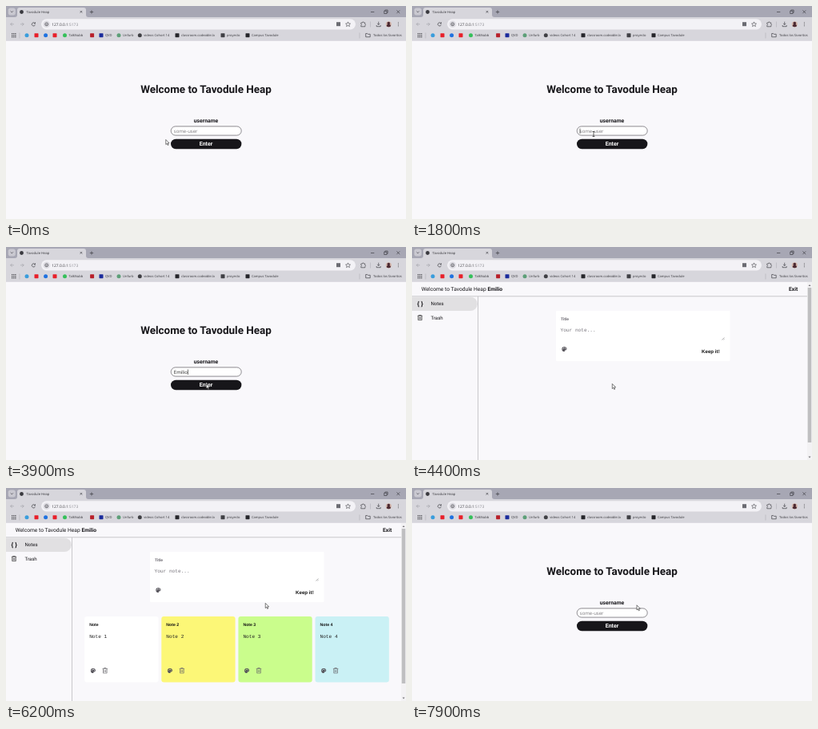
An HTML page that plays this animation: 500 px wide and 267 px high, repeating every 8 s.

```html
<!DOCTYPE html>
<html lang="en">
<head>
<meta charset="utf-8">
<title>Notes demo</title>
<style>
  html, body { margin: 0; width: 100%; height: 100%; overflow: hidden; }
  svg { display: block; width: 100%; height: 100%; }
  text { font-family: Roboto, sans-serif; fill: #17161a; text-rendering: geometricPrecision; white-space: pre; }
  .ui { font-family: "Open Sans", "Noto Sans", sans-serif; fill: #36363b; }
  .mono { font-family: "Liberation Mono", monospace; fill: #222; }
  .arial { font-family: "Liberation Sans", sans-serif; fill: #111; }
  .b { font-weight: 700; }
  .mid { text-anchor: middle; }
  .line { fill: none; stroke: #404045; stroke-width: .7; }
  .pale { stroke: #a3a3aa; }
</style>
</head>
<body>
<svg viewBox="0 0 500 267">
  <defs>
    <symbol id="palette" viewBox="0 0 24 24">
      <path fill="#55535a" d="M12 2a10 10 0 0 0 0 20c2 0 2.5-1.6 1.6-2.8s-.3-2.7 1.4-2.7h2c2.8 0 5-2.2 5-5C22 6 17.5 2 12 2z"/>
      <path stroke="currentColor" stroke-width="3.4" stroke-linecap="round" d="M6.5 11h.01M9.5 6.7h.01M14.5 6.7h.01M17.6 11h.01"/>
    </symbol>
    <symbol id="bin" viewBox="0 0 24 24">
      <path fill="none" stroke="currentColor" stroke-width="2.2" d="M2 5h20M8 4V2h8v2M5 6v16h14V6M9.5 10v8M14.5 10v8"/>
    </symbol>
  </defs>

  <rect width="500" height="267" fill="#f9f8fb"/>

  <g id="login">
    <text class="b mid" x="250" y="108.5" font-size="13.45">Welcome to Tavodule Heap</text>
    <text class="b mid" x="250" y="146.1" font-size="6.8">username</text>
    <rect x="206.2" y="150.9" width="88" height="11.2" rx="5.6" fill="#fff" stroke="#5d5b61" stroke-width=".7"/>
    <text id="field" class="ui" x="209.8" y="158.6" font-size="6"></text>
    <path id="caret" stroke="#111" stroke-width=".6" d="M0 153.5v6.5"/>
    <rect x="206" y="166.8" width="88.4" height="12.4" rx="6.2" fill="#17161a"/>
    <text class="b mid" x="250" y="175.1" font-size="7" style="fill:#fff">Enter</text>
  </g>

  <g id="board">
    <text x="11.7" y="55" font-size="6.7">Welcome to Tavodule Heap <tspan class="b">Emilio</tspan></text>
    <text id="exit" class="b" x="471" y="55" font-size="6.7">Exit</text>
    <path stroke="#c9c8cb" d="M0 61.8H494M82.5 62V267"/>
    <path fill="#e1e0e2" d="M0 62.5H73a8.7 8.7 0 0 1 0 17.5H0z"/>
    <text class="b mid" x="10.2" y="73.8" font-size="8">{ }</text>
    <text x="23.5" y="73.4" font-size="6.1">Notes</text>
    <use href="#bin" x="6.2" y="84.7" width="7.6" height="7.6" color="#222"/>
    <text x="23.5" y="91" font-size="6.1">Trash</text>

    <rect x="180" y="80" width="217.5" height="63" rx="1" fill="#fff"/>
    <text class="b" x="186" y="92" font-size="4.9" style="fill:#6b6870">Title</text>
    <text class="mono" x="185.5" y="105.6" font-size="6.15" style="fill:#75727a">Your note...</text>
    <path class="line" style="stroke-width:.4" d="M387.5 116.5l3-3M389.3 116.5l1.2-1.2"/>
    <use href="#palette" x="186.7" y="124.3" width="7.4" height="7.4" color="#fff"/>
    <text class="arial b" x="362" y="132.6" font-size="6.2">Keep it!</text>
    <g id="notes"></g>

    <rect x="494" y="44" width="6" height="223" fill="#f3f2f4"/>
    <rect x="494.7" y="51" width="4.5" height="194" fill="#bfbfc1"/>
    <path fill="#77757a" d="M495.5 49l1.5-2 1.5 2zM495.5 262.5l1.5 2 1.5-2z"/>
  </g>

  <g id="browser">
    <rect width="500" height="43.8" fill="#d7d6dc"/>
    <rect width="500" height="14" fill="#a7a7b4"/>
    <rect x="2.8" y="2.5" width="9" height="9" rx="2.7" fill="#cac9d1"/>
    <path fill="#d7d6dc" d="M11 14q3 0 3-3V5q0-3 3-3H97q3 0 3 3v6q0 3 3 3z"/>
    <path class="line" d="M5.7 6.3l1.6 1.6 1.6-1.6M92.6 6l2.6 2.6m0-2.6l-2.6 2.6M107 5.3v4.4m-2.2-2.2h4.4M456 7.5h4.3M472.7 6.2h3.3v3.3h-3.3zM473.8 6.2V5h3.3v3.3H476M488.4 5.4l3.8 3.8m0-3.8l-3.800 3.8"/>
    <circle cx="19.5" cy="7.5" r="2.4" fill="#3a3a3f"/>
    <text class="ui" x="25.5" y="9.1" font-size="4.2">Tavodule Heap</text>

    <rect x="44" y="16.2" width="393" height="13.3" rx="6.65" fill="#f3f2f6"/>
    <path class="line pale" d="M9.800 22.8H5.600m2-2l-2 2 2 2M18 22.8h4.2m-2-2l2 2-2 2"/>
    <path class="line" d="M36.2 21.8a2.1 2.1 0 1 0 .2 1.800M36.500 20.300v1.700h-1.700"/>
    <circle cx="50.7" cy="22.8" r="4.3" fill="#dddce2"/>
    <circle class="line" cx="50.7" cy="22.8" r="1.9"/>
    <path class="line" d="M50.7 22.3v1.4"/>
    <text class="ui" x="57.3" y="24.5" font-size="4.85">127.0.0.1<tspan fill="#85858b">:5173</tspan></text>
    <rect x="413" y="20.200" width="5" height="5" fill="#6b6b72"/>
    <path class="line" style="stroke-width:.6" d="M427.5 19.9l.9 2 2.1.2-1.6 1.4.5 2.1-1.9-1.1-1.9 1.1.5-2.1-1.6-1.4 2.100-.2z"/>
    <path class="line" d="M443.8 21h1.6a1 1 0 0 1 2 0h1.400v1.7a1 1 0 0 1 0 1.8v1.3h-5v-1.5a1 1 0 0 0 0-1.8zM465.7 19.7v3.8m-1.600-1.600l1.600 1.600 1.600-1.600M463.2 24v1.7h5V24"/>
    <path stroke="#b1b0b8" stroke-width=".6" d="M455.5 19.5v7M17 33.5v7M442 33.5v7"/>
    <circle cx="478.3" cy="22.8" r="3.6" fill="#d5b8ad"/>
    <path fill="#4b2932" d="M475.6 25.2q0-2 1.5-2.3a1.8 1.8 0 1 1 2.400 0q1.500.3 1.500 2.300-2.700 2-5.400 0z"/>
    <path stroke="#404045" stroke-width="1" stroke-linecap="round" d="M490.3 20.8h.01M490.3 22.8h.01M490.3 24.8h.01"/>
    <path class="line" d="M449.7 34.5h2l.8.8h2.700v3.500h-5.500z"/>
    <text class="ui" x="459" y="38.2" font-size="4.1">Todos los favoritos</text>
    <path stroke="#4d4d52" stroke-width="1.2" stroke-dasharray="1.300 .8" d="M7 34.700h5.500M7 36.800h5.500M7 38.900h5.500"/>
  </g>

  <g id="pointer">
    <path id="arrow" fill="#fff" stroke="#222" stroke-width=".6" d="M0 0v6.1l1.4-1.300 1 2.200 1-.4-1-2.200h1.900z"/>
    <path id="beam" fill="none" stroke="#222" stroke-width=".7" d="M-1.400-3h2.800M0-3v6M-1.400 3h2.800"/>
  </g>
</svg>

<script>
const $ = id => document.getElementById(id);
const LOOP = 8000, NAME = "Emilio";
const SIGN_IN = 4000, NOTES_IN = 4700, SIGN_OUT = 7500;

// Bookmarks: icon centre, colour, shape, label
const bookmarks = [
  [26, "#3a9ddc", "o"], [38, "#e8202a", ""], [49.6, "#1f72e0", "o"], [61, "#e8202a", ""],
  [73.5, "#35c05a", "o", "TalkNubb"], [107.6, "#b8202a", ""], [119, "#1a2b9c", "", "QVD"],
  [141, "#5d9f78", "o", "Unfurb"], [167.3, "#404045", "o", "videos Cohort 14"],
  [214, "#26262b", "", "classroom.codeable.la"], [271, "#404045", "", "proyecto"],
  [302, "#26262b", "", "Campus Tavodule"]
];
$("browser").innerHTML += bookmarks.map(([x, color, shape, label = ""]) =>
  `<rect x="${x - 2.5}" y="34.2" width="5" height="5" rx="${shape ? 2.5 : .6}" fill="${color}"/>
   <text class="ui" x="${x + 5}" y="38.2" font-size="4.05">${label}</text>`).join("");

$("notes").innerHTML = ["#fff", "#fcf777", "#cafd8c", "#caf1f5"].map((color, i) => {
  const x = 98.2 + 96.1 * i;
  return `<rect x="${x}" y="161" width="92.3" height="82.5" rx="3" fill="${color}"/>
    <text class="arial b" x="${x + 6}" y="173.3" font-size="5.2">Note${i ? " " + (i + 1) : ""}</text>
    <text class="mono" x="${x + 6}" y="187.8" font-size="6.15">Note ${i + 1}</text>
    <use href="#palette" x="${x + 7}" y="225.3" width="7.4" height="7.4" color="${color}"/>
    <use href="#bin" x="${x + 21.7}" y="225" width="7.8" height="7.8" color="#66646a"/>`;
}).join("");

// Pointer stops: time, x, y
const stops = [
  [0, 199.8, 167.5], [500, 199.8, 167.5], [1300, 227, 160.5], [3300, 227, 160.5],
  [3800, 250.3, 171.5], [4500, 250.3, 171.5], [5150, 289.5, 163.5],
  [5900, 289.5, 163.5], [7000, 478.7, 59.5], [7450, 478.7, 59.5],
  [7900, 281, 146.8], [LOOP, 281, 146.8]
];

function pointerAt(t) {
  const i = stops.findIndex(s => s[0] > t);
  const [t0, x0, y0] = stops[i - 1], [t1, x1, y1] = stops[i];
  const p = (t - t0) / (t1 - t0), e = p * p * (3 - 2 * p);
  return [x0 + (x1 - x0) * e, y0 + (y1 - y0) * e];
}

const show = (id, on) => $(id).style.display = on ? "" : "none";

function draw(t) {
  const [x, y] = pointerAt(t);
  const signedIn = t >= SIGN_IN && t < SIGN_OUT;
  const overField = !signedIn && x > 206 && x < 294 && y > 151 && y < 162;
  const overExit = signedIn && x > 468 && y < 62;
  show("login", !signedIn);
  show("board", signedIn);
  show("notes", t >= NOTES_IN);
  show("arrow", !overField && !overExit);
  show("beam", overField || overExit);
  $("pointer").setAttribute("transform", `translate(${x} ${y})`);
  $("exit").style.opacity = overExit ? .25 : 1;

  const typed = t < SIGN_IN ? NAME.slice(0, Math.max(0, Math.floor((t - 1900) / 150))) : "";
  const field = $("field");
  field.textContent = typed || "some-user";
  field.style.fill = typed ? "#222" : "#7a787c";
  const typing = t > 1950 && t < 3100;
  show("caret", t > 1500 && t < SIGN_IN && (typing || (t - 1500) % 1000 < 500));
  const caretX = 210 + (typed ? field.getComputedTextLength() + .3 : 0);
  $("caret").setAttribute("transform", `translate(${caretX} 0)`);
}

function tick() {
  draw(performance.now() % LOOP);
  requestAnimationFrame(tick);
}
tick();
</script>
</body>
</html>
```
